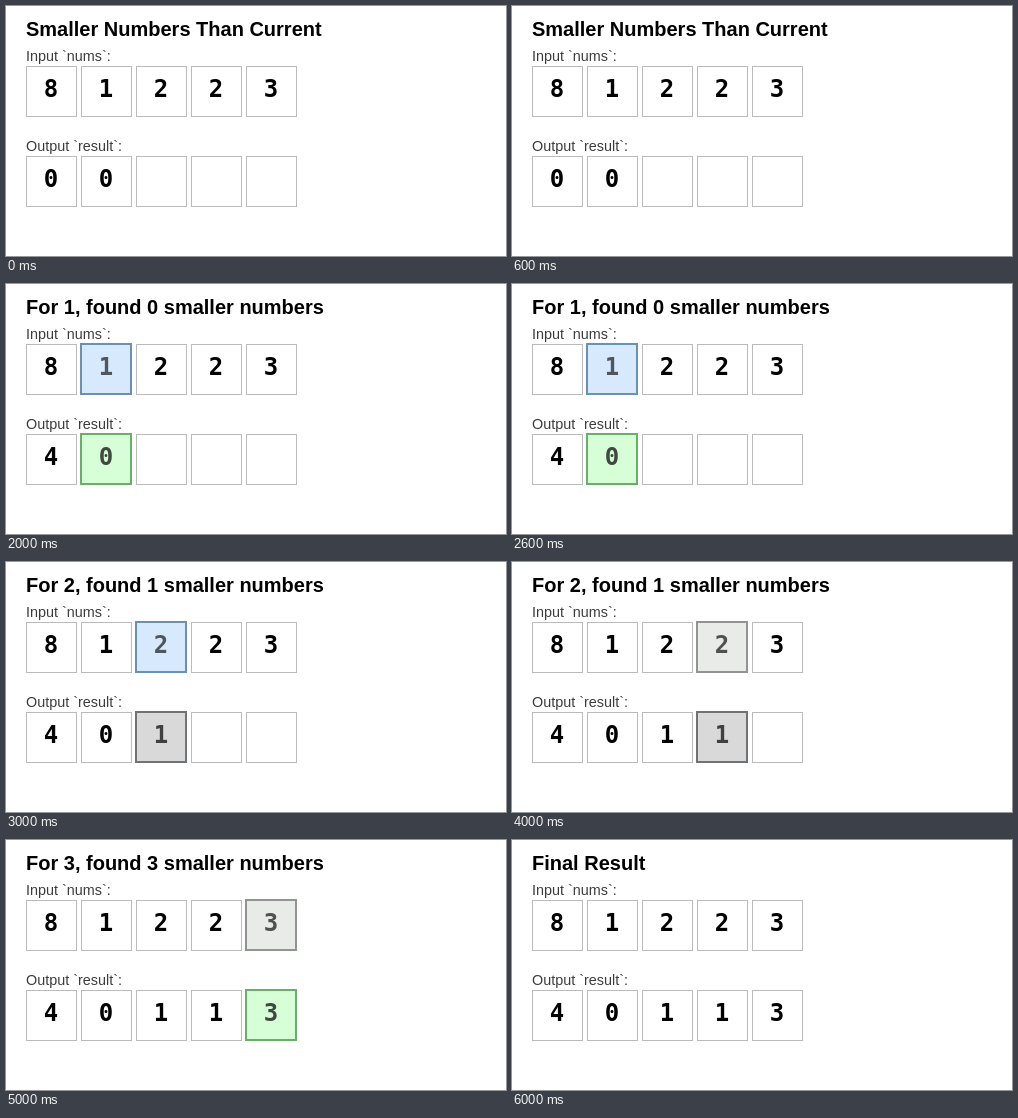
An HTML page for the animation above (7000 ms loop, 500 px wide and 250 px high).

```html
<!DOCTYPE html>
<html lang="en">
<head>
<meta charset="utf-8">
<title>Smaller Numbers Than Current</title>
<style>
  html, body { margin: 0; width: 100%; height: 100%; overflow: hidden; background: #fff; }
  svg { display: block; }
  text { font-family: Arial, "Liberation Sans", sans-serif; }
  .title { font-size: 20px; font-weight: bold; }
  .label { font-size: 14.4px; fill: #3c3c3c; }
  .digit { font: bold 24px "DejaVu Sans Mono", monospace; text-anchor: middle; }
</style>
</head>
<body>
<svg id="stage" width="500" height="250"></svg>
<script>
const STEP_MS = 1000;
const nums = [8, 1, 2, 2, 3];
const counts = nums.map(n => nums.filter(m => m < n).length);

// Highlight styles: [fill, border, digit]
const green = ['#d7ffd7', '#68b068', '#404840'];
const blue = ['#d7eafd', '#6a90b8', '#50565c'];
const dark = ['#d9d9d9', '#707376', '#404040'];
const light = ['#e9ebe9', '#929492', '#505050'];
const highlights = [[light, green], [blue, green], [blue, dark], [light, dark], [light, green]];

const stage = document.getElementById('stage');

function cell(value, i, y, style) {
  const x = 20 + 55 * i;
  const [fill, border, ink] = style || ['#fff', '#bbb', '#000'];
  const offset = style ? 0 : 0.5;
  return `<rect x="${x + offset}" y="${y + offset}" width="50" height="50"
      fill="${fill}" stroke="${border}" stroke-width="${style ? 2 : 1}"/>
    <text class="digit" x="${x + 25}" y="${y + 31}" fill="${ink}">${value}</text>`;
}

function row(label, values, y, active, style) {
  return `<text class="label" x="20" y="${y - 5}">${label}</text>` +
    values.map((v, i) => cell(v, i, y, i === active && style)).join('');
}

function render(step) {
  const active = step - 1;
  const [inputStyle, outputStyle] = highlights[active] || [];
  const title = step === 0 ? 'Smaller Numbers Than Current'
    : active < nums.length ? `For ${nums[active]}, found ${counts[active]} smaller numbers`
    : 'Final Result';
  // The second result is already zero before it is visited.
  const result = counts.map((c, i) => i <= active ? c : i < 2 ? 0 : '');
  stage.innerHTML = `<text class="title" x="20" y="30">${title}</text>` +
    row('Input `nums`:', nums, 60, active, inputStyle) +
    row('Output `result`:', result, 150, active, outputStyle);
}

let shown = -1;
function tick() {
  const step = Math.floor(performance.now() / STEP_MS) % (nums.length + 2);
  if (step !== shown) render(shown = step);
  requestAnimationFrame(tick);
}
tick();
</script>
</body>
</html>
```
